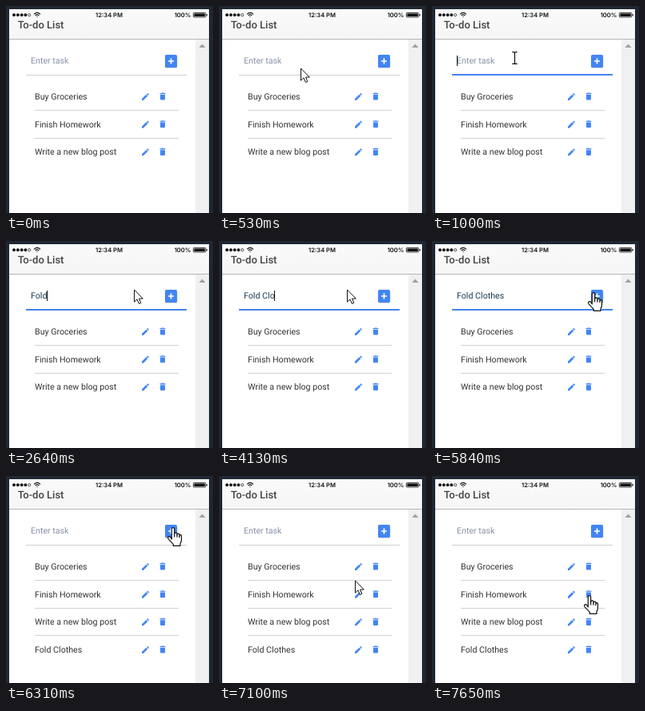
Animation, 259 px wide and 259 px high, one loop 8000 ms. Source, as an HTML page:

```html
<!DOCTYPE html>
<html lang="en">
<head>
<meta charset="utf-8">
<title>To-do List</title>
<style>
  html, body { margin: 0; width: 100%; height: 100%; overflow: hidden; background: #1f2733; }
  svg { display: block; width: 100vw; height: 100vh; }
  text { font-family: Roboto, sans-serif; font-size: 10.67px; fill: #333; white-space: pre; text-rendering: geometricPrecision; }
  .status { font: 600 7.6px Inter, sans-serif; fill: #111; }
  .title { font-size: 13px; font-weight: 500; fill: #424242; }
</style>
</head>
<body>
<svg viewBox="0 0 259 259">
  <defs>
    <linearGradient id="bar" x2="0" y2="1">
      <stop offset="0" stop-color="#fafafa"/><stop offset="1" stop-color="#f6f6f7"/>
    </linearGradient>
    <g id="pencil" fill="#4285f4">
      <path d="M0 7.1V9H1.9L7.3 3.6 5.4 1.7ZM6 1.1 7.9 3 8.8 2.1Q9.1 1.8 8.8 1.5L7.5.2Q7.2-.1 6.9.2Z"/>
    </g>
    <g id="trash" fill="#4285f4">
      <path d="M.5 0H2.3L2.8-.5H5.2L5.7 0H7.5V1.1H.5ZM1 1.8H7V7.6Q7 8.6 6 8.6H2Q1 8.6 1 7.6Z"/>
    </g>
    <path id="arrow" fill="#fff" stroke="#111" d="M.5 1V16.2L4 12.9 6.4 18.5 8.8 17.5 6.5 12.1H11.3Z"/>
    <path id="beam" fill="none" stroke="#111" stroke-width="1.2" d="M.3.6H2.2Q3.5.6 3.5 2V14Q3.5 15.4 2.2 15.4H.3M6.7.6H4.8Q3.5.6 3.5 2V14Q3.5 15.4 4.8 15.4H6.7"/>
    <g id="hand" stroke="#111" stroke-linejoin="round" stroke-width="1.2">
      <path fill="#fff" d="M5.3 15V2.3a1.7 1.7 0 0 1 3.4 0V9 8.6a1.6 1.6 0 0 1 3.3 0V10 9.6a1.5 1.5 0 0 1 3 0V11 10.8a1.2 1.2 0 0 1 2.5 0V16Q17.5 18.5 16 20.5V23.4H7.3V21.3L1 14.6Q0 12.6 1.6 11.9T4 13Z"/>
      <path fill="none" d="M8.7 8V12.5M12 9.5V12.8M15 10.5V13.2"/>
    </g>
  </defs>

  <rect width="259" height="259" fill="#1f2733"/>
  <rect x="4" y="4" width="250" height="255" fill="#fff"/>
  <rect x="4" y="4" width="250" height="37" fill="url(#bar)"/>
  <rect x="4" y="41" width="250" height="1" fill="#b7b7b9"/>
  <rect x="237" y="42" width="17" height="217" fill="#f0f0f0"/>
  <path d="M241.5 52 245.5 47.5 249.5 52Z" fill="#a0a0a0"/>

  <g id="dots" stroke="#111" stroke-width=".7"></g>
  <g fill="none" stroke="#111" stroke-width="1.1">
    <path d="M35 10.3Q39 6.6 43 10.3M36.7 12Q39 9.9 41.3 12"/>
    <path d="M38 13.2H40L39 14.3Z" fill="#111" stroke="none"/>
  </g>
  <text class="status" x="129" y="14" text-anchor="middle">12:34 PM</text>
  <text class="status" x="231.5" y="14" text-anchor="end">100%</text>
  <rect x="234.4" y="8.4" width="15.4" height="5.6" rx="1" fill="none" stroke="#111" stroke-width=".8"/>
  <rect x="235.4" y="9.4" width="13.4" height="3.6" fill="#111"/>
  <rect x="250.6" y="9.9" width="1.2" height="2.6" rx=".6" fill="#111"/>
  <text class="title" x="14.8" y="28">To-do List</text>

  <text id="entry" x="31" y="72"></text>
  <rect id="caret" y="62" width="1" height="13" fill="#111"/>
  <rect id="underline" x="25" width="201"/>
  <rect x="199" y="62.4" width="15.4" height="15.4" rx="2" fill="#000" opacity=".2"/>
  <rect x="199" y="61" width="15" height="16" rx="1.6" fill="#4285f4"/>
  <path d="M203 69H210M206.5 65.5V72.5" stroke="#fff" stroke-width="1.7"/>

  <g id="list"></g>
  <use id="cursor"/>
</svg>
<script>
const LOOP = 8000, FOCUS = 850, SUBMIT = 6230, BLINK = 530;
const TASKS = ['Buy Groceries', 'Finish Homework', 'Write a new blog post', 'Fold Clothes'];
const NEW_TASK = TASKS[3];
const KEY_TIMES = [1930, 2240, 2470, 2640, 3260, 3570, 3800, 4130, 4280, 4430, 4740, 4970];

// time, shape, left, top
const CURSOR = [
  [150, 'arrow', 64, 143], [220, 'arrow', 107, 87],
  [380, 'arrow', 105, 83], [450, 'arrow', 103, 79], [530, 'arrow', 102, 77],
  [680, 'beam', 100, 57], [850, 'beam', 100, 57], [1000, 'beam', 100, 57],
  [1080, 'beam', 122, 55], [1150, 'arrow', 149, 59], [1230, 'arrow', 160, 60],
  [5670, 'arrow', 170, 59], [5750, 'arrow', 186, 58], [5840, 'hand', 195, 64],
  [5920, 'hand', 198, 63], [6000, 'hand', 201, 63], [6080, 'hand', 202, 64],
  [6780, 'hand', 200, 68], [6860, 'arrow', 198, 84], [6940, 'arrow', 185, 100],
  [7020, 'hand', 167, 112], [7090, 'arrow', 170, 130], [7170, 'hand', 163, 147],
  [7250, 'arrow', 173, 161], [7330, 'arrow', 183, 168], [7410, 'arrow', 190, 165],
  [7490, 'arrow', 193, 157], [7570, 'hand', 186, 145], [7650, 'hand', 190, 149]
];

const $ = id => document.getElementById(id);
const set = (el, attrs) => { for (const k in attrs) el.setAttribute(k, attrs[k]); };
const show = (el, on) => set(el, { visibility: on ? 'visible' : 'hidden' });

$('dots').innerHTML = [0, 1, 2, 3, 4].map(i =>
  `<circle cx="${10 + i * 4.8}" cy="11.2" r="1.6" fill="${i < 4 ? '#111' : 'none'}"/>`).join('');

$('list').innerHTML = TASKS.map((task, i) => {
  const y = 117 + i * 34.67;
  const line = i ? `<rect x="36" y="${Math.round(y - 21.6)}" width="180" height="1" fill="#d2d2d2"/>` : '';
  return `<g>${line}<text x="36" y="${y}">${task}</text>
    <use href="#pencil" x="170" y="${y - 8}"/><use href="#trash" x="192" y="${y - 8}"/></g>`;
}).join('');
const newRow = $('list').lastElementChild;

function drawEntry(t) {
  const focused = t >= FOCUS && t < SUBMIT;
  const typed = focused ? KEY_TIMES.filter(k => k <= t).length : 0;
  const entry = $('entry');
  entry.textContent = typed ? NEW_TASK.slice(0, typed) : 'Enter task';
  entry.style.fill = typed ? '#1b3a54' : '#8791a8';

  const lastInput = typed ? KEY_TIMES[typed - 1] : FOCUS;
  const width = typed ? entry.getComputedTextLength() : 0;
  set($('caret'), { x: Math.floor(31 + width) });
  show($('caret'), focused && Math.floor((t - lastInput) / BLINK) % 2 === 0);
  set($('underline'), focused
    ? { y: 85, height: 2, fill: '#4285f4' }
    : { y: 86, height: 1, fill: '#cfcfcf' });
}

function drawCursor(t) {
  const pose = CURSOR.filter(c => c[0] <= t).pop();
  show($('cursor'), pose);
  if (pose) set($('cursor'), { href: '#' + pose[1], x: pose[2], y: pose[3] });
}

function draw(t) {
  drawEntry(t);
  show(newRow, t >= SUBMIT);
  drawCursor(t);
}

const start = performance.now();
function tick() {
  draw((performance.now() - start) % LOOP);
  requestAnimationFrame(tick);
}
tick();
</script>
</body>
</html>
```
